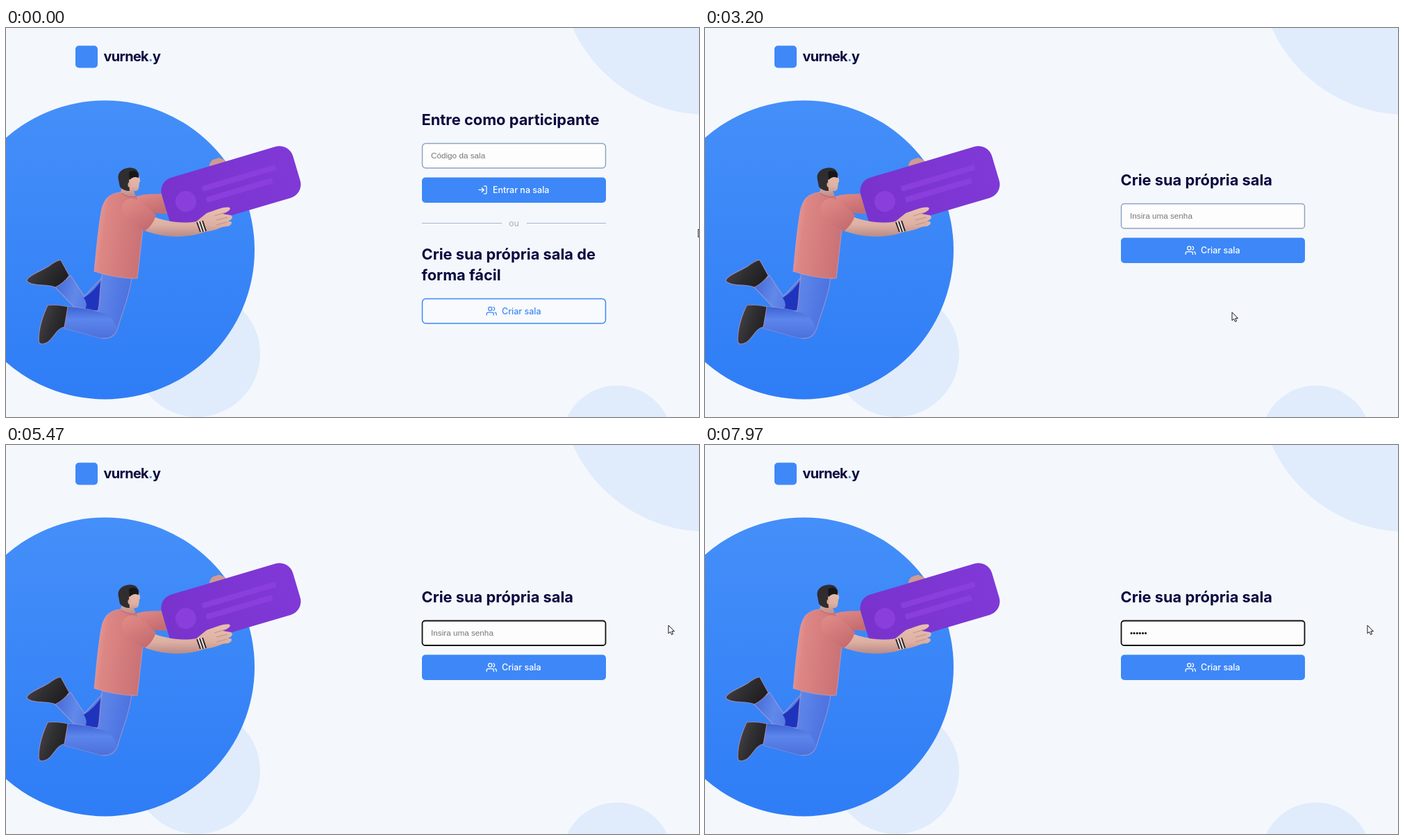
Write an HTML page that moves like this. It is 998 by 561 pixels and loops after 8000 ms.

```html
<!DOCTYPE html>
<html lang="pt-BR">
<head>
<meta charset="utf-8">
<title>Criar sala</title>
<style>
  html, body { margin: 0; width: 100%; height: 100%; overflow: hidden; background: #f4f8fd; }
  svg { display: block; width: 100%; height: 100%; }
  text { font-family: Inter, sans-serif; }
  .title { font-size: 21.85px; font-weight: 700; fill: #08083f; }
  .label { font-size: 12.5px; font-weight: 500; }
  .field { font-family: "Liberation Sans", Arial, sans-serif; font-size: 11.73px; fill: #777; }
  .box { fill: #fdfdfd; stroke: #91a3c1; stroke-width: 1.5; }
  .solid { fill: #3d87f8; }
  .icon { fill: none; stroke: currentColor; stroke-width: 2; stroke-linecap: round; stroke-linejoin: round; }
  .light { color: #fff; }
  .light text, #create text { fill: currentColor; }
  #create { color: #3d87f8; }
  #create rect { fill: #f8fafd; stroke: currentColor; stroke-width: 1.5; }
  #create.hover { color: #399fee; }
  #create.hover rect { fill: #fdfeff; }
  #password.focus { stroke: #111; stroke-width: 1.8; }
  #pointer path { fill: #fff; stroke: #15151c; stroke-width: 1; stroke-linejoin: round; }
  .rim { stroke: #d9a2b8; stroke-opacity: .55; stroke-width: 1.2; }
</style>
</head>
<body>
<svg viewBox="0 0 998 561" preserveAspectRatio="none">
  <defs>
    <linearGradient id="disc" x2="0" y2="1"><stop stop-color="#448ff9"/><stop offset="1" stop-color="#2f7df6"/></linearGradient>
    <linearGradient id="card" x2="1"><stop stop-color="#7932cc"/><stop offset="1" stop-color="#8039d7"/></linearGradient>
    <linearGradient id="shirt" x2="1" y2=".25"><stop stop-color="#eda39d"/><stop offset=".3" stop-color="#dd8785"/><stop offset="1" stop-color="#cb7376"/></linearGradient>
    <linearGradient id="sleeve" x2=".6" y2="1"><stop stop-color="#e28d89"/><stop offset="1" stop-color="#c66c70"/></linearGradient>
    <linearGradient id="skin" x2="0" y2="1"><stop stop-color="#e8c0b1"/><stop offset=".6" stop-color="#ddb0a2"/><stop offset="1" stop-color="#b98a88"/></linearGradient>
    <linearGradient id="jeans" x2="1" y2=".2"><stop stop-color="#4267d6"/><stop offset=".5" stop-color="#6189ea"/><stop offset="1" stop-color="#4b72df"/></linearGradient>
    <linearGradient id="shin" x2="0" y2="1"><stop stop-color="#3c62d4"/><stop offset=".4" stop-color="#5c86ec"/><stop offset="1" stop-color="#4c70da"/></linearGradient>
    <linearGradient id="shoe" x2="1" y2=".5"><stop stop-color="#4c494d"/><stop offset=".55" stop-color="#2f2e31"/><stop offset="1" stop-color="#1f1f22"/></linearGradient>
    <g id="users" class="icon">
      <path d="M17 21v-2a4 4 0 0 0-4-4H5a4 4 0 0 0-4 4v2M23 21v-2a4 4 0 0 0-3-3.87M16 3.13a4 4 0 0 1 0 7.75"/>
      <circle cx="9" cy="7" r="4"/>
    </g>
  </defs>

  <rect width="998" height="561" fill="#f4f8fd"/>
  <g fill="#e0ecfc">
    <circle cx="1010" cy="-88" r="213"/>
    <circle cx="880" cy="595" r="79.5"/>
    <circle cx="275" cy="470" r="91"/>
  </g>
  <circle cx="142.5" cy="320" r="215.5" fill="url(#disc)"/>

  <rect x="100" y="25.5" width="32" height="32" rx="5" fill="#3f88f8"/>
  <text x="140.5" y="47.5" font-size="20" font-weight="700" letter-spacing="-.7" fill="#08083f">vurnek<tspan fill="#3f88f8">.</tspan>y</text>

  <g id="figure">
    <path d="M293 202Q292 194 298 190L307 187 316 191 312 202Z" fill="#cf9b93"/>
    <!-- far leg and shoe -->
    <path class="rim" d="M93 357L113 387 140 358 140 406 103 408 71 374Z" fill="url(#jeans)"/>
    <path d="M112 389Q127 380 139 362L135 407 113 407Q119 399 112 389Z" fill="#1f34bd"/>
    <path class="rim" d="M30 365C30 358 49 351 61 344 69 338 75 334 79 335L91 357Q83 368 71 374C60 368 40 374 30 365Z" fill="url(#shoe)"/>
    <!-- near leg and shoe -->
    <path class="rim" d="M139 352L181 359C178 387 167 411 161 433 156 447 147 449 136 447L84 433 89 402Q112 403 132 409C136 397 134 376 139 352Z" fill="url(#jeans)"/>
    <path d="M89 402Q118 404 135 410 154 414 160 434 154 448 136 447L84 433Z" fill="url(#shin)"/>
    <path class="rim" d="M47.500 453C46 435 54 413 60 400 68 399 80 400 89 402L84 431C72 434 69 447 60 453 55 456 49 457 47.500 453Z" fill="url(#shoe)"/>
    <!-- far arm -->
    <path d="M180 247C194 238 209 240 224 239L232 268 214 267Z" fill="url(#sleeve)"/>
    <!-- card -->
    <g transform="translate(324 230.300) rotate(-16.500)">
      <rect x="-98.500" y="-38.500" width="197" height="77" rx="20" fill="url(#card)"/>
      <g fill="#8a3fdc">
        <circle cx="-68" cy=".5" r="15"/>
        <rect x="-40" y="-14" width="110" height="8" rx="1.500"/>
        <rect x="-39" y="3" width="99" height="8" rx="1.500"/>
      </g>
    </g>
    <!-- head -->
    <path d="M174 211L190 206 192 216Q194.500 221 192 223L191 231Q190 236 184 235L187 243Q175 246 164 239L169 226Z" fill="url(#skin)"/>
    <path d="M161.500 216C161 206 171 201 180 201.500 188 202 193 208 191 216L184 214 177 219 178 235Q169 235 164 229Z" fill="#302d30"/>
    <path d="M177 208Q184 203 190 209L191 216Q184 213 178 219Z" fill="#171719"/>
    <ellipse cx="177.500" cy="226" rx="2" ry="3.500" fill="#dba99c"/>
    <!-- near arm, torso -->
    <path d="M210 271C229 279 254 283 274 279L289 267C301 263 314 257 322 259 325 262 318 266 312 268L324 270C328 273 325 277 319 279L324 279Q327 283 320 286C309 286 302 293 287 294 262 303 230 304 199 292Z" fill="url(#skin)"/>
    <path d="M300 271L316 266M303 277L319 273M303 284L318 280" stroke="#b98580" stroke-width=".8" fill="none"/>
    <path d="M275 280L280 294M279 279L284 294M283 278L288 293" stroke="#28282c" stroke-width="2"/>
    <path d="M277 279.500L282 294M281 278.500L286 293.500" stroke="#ece7e5" stroke-width="1.600"/>
    <path class="rim" d="M164 237C147 239 140 249 137 265 132 294 130 322 127 351 146 357 169 362 189 361 192 339 194 315 197 291L190 244Q178 243 164 237Z" fill="url(#shirt)"/>
    <path d="M172 249C185 240 198 252 216 270Q212 284 200 293C190 287 179 282 170 271 165 264 166 254 172 249Z" fill="url(#sleeve)"/>
    <path d="M166 238Q176 245 188 243" stroke="#b9616b" fill="none"/>
  </g>

  <g id="home">
    <text class="title" x="598.500" y="139.500">Entre como participante</text>
    <rect class="box" x="599.500" y="166.500" width="264" height="35.500" rx="5"/>
    <text class="field" x="612" y="188">Código da sala</text>
    <rect class="solid" x="599" y="215.500" width="265" height="36.500" rx="5"/>
    <g class="light">
      <path class="icon" transform="translate(679 226) scale(.62)" d="M15 3h4a2 2 0 0 1 2 2v14a2 2 0 0 1-2 2h-4M10 17l5-5-5-5M15 12H3"/>
      <text class="label" x="701" y="238">Entrar na sala</text>
    </g>
    <path d="M599 281.500H714M750 281.500H864" stroke="#a5b4ca"/>
    <text class="label" x="731.500" y="285.500" text-anchor="middle" style="fill:#a4b2c8;font-weight:400">ou</text>
    <text class="title" x="598.500" y="333.500">Crie sua própria sala de</text>
    <text class="title" x="598.500" y="364">forma fácil</text>
    <g id="create">
      <rect x="599.500" y="390.500" width="264" height="35.500" rx="5"/>
      <use href="#users" transform="translate(691.500 400.500) scale(.64)"/>
      <text class="label" x="714" y="412.500">Criar sala</text>
    </g>
    <g id="status">
      <path d="M0 545.500H110Q112 545.500 112 548V561H0Z" fill="#55585c"/>
      <text x="4" y="556.500" font-size="8.260" fill="#dfe2e5" style="font-family:'Open Sans',sans-serif">localhost:3000/create-pass</text>
    </g>
  </g>

  <g id="room">
    <text class="title" x="598.500" y="226.500">Crie sua própria sala</text>
    <rect id="password" class="box" x="599.500" y="253.500" width="264" height="35.500" rx="4"/>
    <text id="hint" class="field" x="612" y="274.800">Insira uma senha</text>
    <text id="dots" class="field" x="612" y="274.800" style="fill:#111"></text>
    <rect id="caret" y="264" width="1" height="13" fill="#111"/>
    <rect class="solid" x="599" y="302.500" width="265" height="36.500" rx="5"/>
    <g class="light">
      <use href="#users" transform="translate(691.500 313) scale(.64)"/>
      <text class="label" x="714" y="325">Criar sala</text>
    </g>
  </g>

  <g id="pointer">
    <path id="arrow" d="M0 0V11.800L2.700 9.400 4.600 13.500 6.600 12.600 4.800 8.700H8.500Z"/>
    <path id="hand" d="M-1.300 1.200a1.300 1.300 0 0 1 2.600 0V5.500L7 6.700Q8.700 7.200 8.400 9L7.700 13.500 6.800 16.500H.5L-4.300 10.500Q-5 8.800-3.400 8.700L-1.300 10.300Z"/>
    <path id="beam" style="fill:none" d="M-2-6H2M0-6V6M-2 6H2"/>
  </g>
</svg>
<script>
const LOOP = 8000, PAGE_AT = 2560, FOCUS_AT = 4760, BLINK = 530;
const KEYS = [6170, 6390, 6600, 6800, 7000, 7210];
const BULLET = 4.1;
// time, x, y of the pointer tip
const PATH = [
  [0, 997, 290], [350, 985, 302], [1300, 752, 406], [1650, 745, 411], [2650, 745, 411],
  [2950, 759, 410], [3400, 759, 410], [4000, 887, 327], [4150, 887, 327],
  [4400, 878, 288], [4700, 806, 271], [4850, 806, 271], [5350, 954, 260], [LOOP, 954, 260]
];
const $ = id => document.getElementById(id);
const show = (id, on) => { $(id).style.display = on ? "" : "none"; };
const ease = k => k * k * (3 - 2 * k);

function pointerAt(t) {
  const i = PATH.findIndex(p => p[0] > t);
  const [t0, x0, y0] = PATH[i - 1], [t1, x1, y1] = PATH[i];
  const k = ease((t - t0) / (t1 - t0));
  return [x0 + (x1 - x0) * k, y0 + (y1 - y0) * k];
}

function draw(t) {
  const home = t < PAGE_AT;
  const [x, y] = pointerAt(t);
  const over = (top, bottom) => x > 599 && x < 864 && y > top && y < bottom;
  const onCreate = home && over(390, 426);
  const onButton = onCreate || (home ? over(216, 252) : over(302, 339));
  const onField = home ? over(166, 202) : over(253, 289);
  show("home", home);
  show("room", !home);
  show("status", onCreate);
  $("create").classList.toggle("hover", onCreate);

  const focused = t >= FOCUS_AT;
  const typed = KEYS.filter(k => k <= t).length;
  const since = t - (typed ? KEYS[typed - 1] : FOCUS_AT);
  $("password").classList.toggle("focus", focused);
  show("hint", !typed);
  $("dots").textContent = "•".repeat(typed);
  show("caret", focused && since % (2 * BLINK) < BLINK);
  $("caret").setAttribute("x", 612 + typed * BULLET);

  $("pointer").setAttribute("transform", `translate(${x} ${y})`);
  show("hand", onButton);
  show("beam", onField);
  show("arrow", !onButton && !onField);
}

const start = performance.now();
function tick() {
  draw((performance.now() - start) % LOOP);
  requestAnimationFrame(tick);
}
tick();
</script>
</body>
</html>
```
